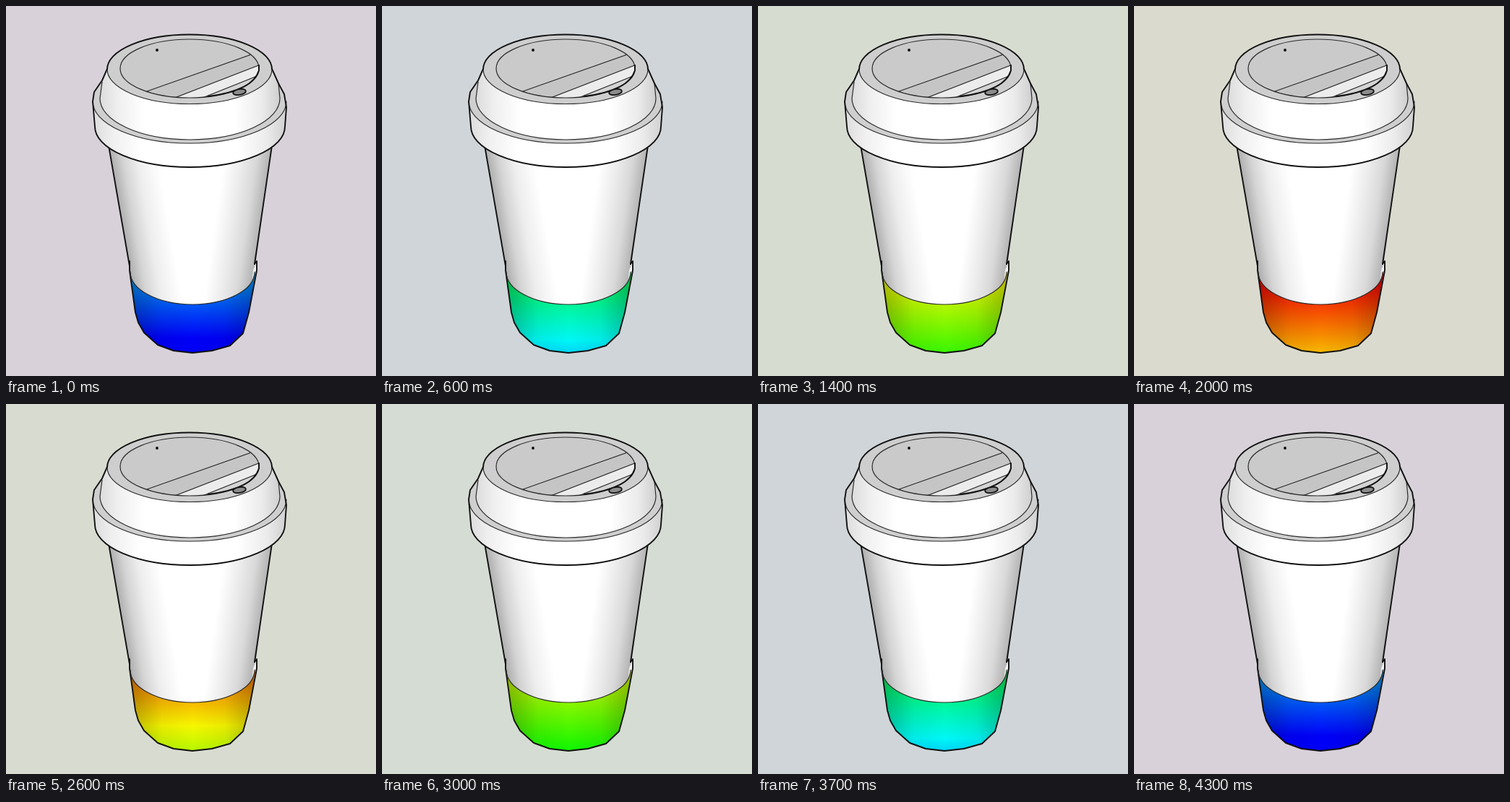
Write an HTML page without scripts that moves like this. It is 512 px wide and 512 px high and loops after 4.4 s.

```html
<!DOCTYPE html>
<html lang="en">
<head>
<meta charset="utf-8">
<title>Coffee cup</title>
<style>
  html, body { margin: 0; width: 100%; height: 100%; overflow: hidden; }
  svg { display: block; width: 100%; height: 100%; }
  .line { fill: none; stroke: #111; stroke-width: 1.9; stroke-linejoin: round; stroke-linecap: round; }
  .thin { stroke: #2a2a2a; stroke-width: 1.2; }

  /* 22 held poses, played forwards then backwards */
  .backdrop { animation: tint 2.2s infinite alternate; }
  .rainbow { animation: slide 2.2s steps(22, jump-none) infinite alternate; }

  @keyframes slide { to { transform: translateY(473px); } }
  @keyframes tint {
    0% { fill: #d8d1da; animation-timing-function: steps(6); }
    27.2727% { fill: #d0d5d9; animation-timing-function: steps(4); }
    45.4545% { fill: #d0dad8; animation-timing-function: steps(4); }
    63.6364% { fill: #d7dcd1; animation-timing-function: steps(3); }
    77.2727% { fill: #d8dcd0; animation-timing-function: steps(4); }
    95.4545%, 100% { fill: #dad9cd; }
  }
</style>
</head>
<body>
<svg viewBox="0 0 512 512">
  <defs>
    <linearGradient id="hues" gradientUnits="userSpaceOnUse" x1="0" y1="-70" x2="0" y2="460">
      <stop offset="0" stop-color="#f00"/>
      <stop offset=".25" stop-color="#ff0"/>
      <stop offset=".5" stop-color="#0f0"/>
      <stop offset=".75" stop-color="#0ff"/>
      <stop offset="1" stop-color="#00f"/>
    </linearGradient>
    <!-- shade bands follow the slanted sides -->
    <linearGradient id="shadeL" gradientUnits="userSpaceOnUse" x1="142" y1="193" x2="206" y2="182">
      <stop offset="0" stop-opacity=".32"/>
      <stop offset=".25" stop-opacity=".17"/>
      <stop offset=".55" stop-opacity=".07"/>
      <stop offset="1" stop-opacity="0"/>
    </linearGradient>
    <linearGradient id="shadeR" gradientUnits="userSpaceOnUse" x1="368" y1="193" x2="306" y2="184">
      <stop offset="0" stop-opacity=".3"/>
      <stop offset=".3" stop-opacity=".15"/>
      <stop offset=".6" stop-opacity=".08"/>
      <stop offset="1" stop-opacity="0"/>
    </linearGradient>
    <linearGradient id="sleeveShade">
      <stop offset="0" stop-opacity=".28"/>
      <stop offset=".25" stop-opacity=".08"/>
      <stop offset=".5" stop-opacity=".03"/>
      <stop offset=".75" stop-opacity=".08"/>
      <stop offset="1" stop-opacity=".28"/>
    </linearGradient>
    <linearGradient id="lidShade">
      <stop offset="0" stop-color="#dcdcdc"/>
      <stop offset=".1" stop-color="#efefef"/>
      <stop offset=".25" stop-color="#fff"/>
      <stop offset=".75" stop-color="#fff"/>
      <stop offset=".9" stop-color="#ebebeb"/>
      <stop offset="1" stop-color="#cfcfcf"/>
    </linearGradient>
    <path id="body" d="M142 190L172 368A86 45 0 0 0 344 368L368 190Z"/>
    <path id="sleeve" d="M172 368L179 424L183 438L191 452L210 469L232 477L258 480L285 477L310 470L328 453L336 424L346 366L344 368A86 45 0 0 1 172 368Z"/>
    <clipPath id="band"><use href="#sleeve"/></clipPath>
    <clipPath id="well"><ellipse cx="254" cy="86.5" rx="96" ry="40.5"/></clipPath>
  </defs>

  <rect class="backdrop" width="512" height="512"/>

  <g id="cup">
    <use href="#body" fill="#fff"/>
    <use href="#body" fill="url(#shadeL)"/>
    <use href="#body" fill="url(#shadeR)"/>
    <path class="line" d="M142 193L171 360M368 193L344 357"/>
  </g>

  <g clip-path="url(#band)">
    <rect class="rainbow" y="-600" width="512" height="1200" fill="url(#hues)"/>
    <use href="#sleeve" fill="url(#sleeveShade)"/>
  </g>
  <path d="M342 366L347 353L346 366L341 378Z" fill="#f4f4f4"/>
  <path class="line" d="M171 353V366L179 424L183 438L191 452L210 469L232 477L258 480L285 477L310 470L328 453L336 424L347 366V353L344 357"/>
  <path class="line thin" d="M172 368A86 45 0 0 0 344 368"/>

  <g id="lid">
    <path fill="url(#lidShade)" d="M120 132L123 167A131.5 56 0 0 0 386 167L388 132Z"/>
    <path fill="#cfcfcf" d="M133 103L122 119L120 132A134 58 0 0 0 388 132L385 122L377 107Z"/>
    <path class="line thin" d="M120 132A134 58 0 0 0 388 132"/>
    <path fill="url(#lidShade)" d="M140 87L133 106L130 128A124.5 57 0 0 0 379 128L377 107L368 87Z"/>
    <path class="line thin" d="M133 105L130 128A124.5 57 0 0 0 379 128L377 107"/>
    <path class="line" d="M140 87L133 103L122 119L120 132L123 167A131.5 56 0 0 0 386 167L388 140L385 122L377 107L368 87"/>
    <ellipse cx="254" cy="87.5" rx="114" ry="48" fill="#cecece"/>
    <path class="line thin" d="M140 87.5A114 48 0 0 0 368 87.5"/>
    <path class="line" d="M140 87.5A114 48 0 0 1 368 87.5"/>

    <ellipse cx="254" cy="86.5" rx="96" ry="40.5" fill="#cacaca"/>
    <g clip-path="url(#well)">
      <path d="M188 120.5L351 63L360 78L231 128Z" fill="#c5c5c5"/>
      <path d="M231 128L360 78V92L272 127Z" fill="#ececec"/>
      <path d="M272 127L360 92L350 130Z" fill="#d4d4d4"/>
      <path class="line thin" d="M188 120.5L351 63M231 128L360 78M272 127L360 92"/>
    </g>
    <ellipse class="line thin" cx="254" cy="86.5" rx="96" ry="40.5"/>
    <path class="line" d="M280 125Q342 117 350 89V82"/>
    <ellipse cx="323" cy="119" rx="9" ry="4" transform="rotate(-9 323 119)" fill="#8c8c8c" stroke="#111" stroke-width="1.8"/>
    <circle cx="209" cy="61" r="2" fill="#111"/>
  </g>
</svg>
</body>
</html>
```
